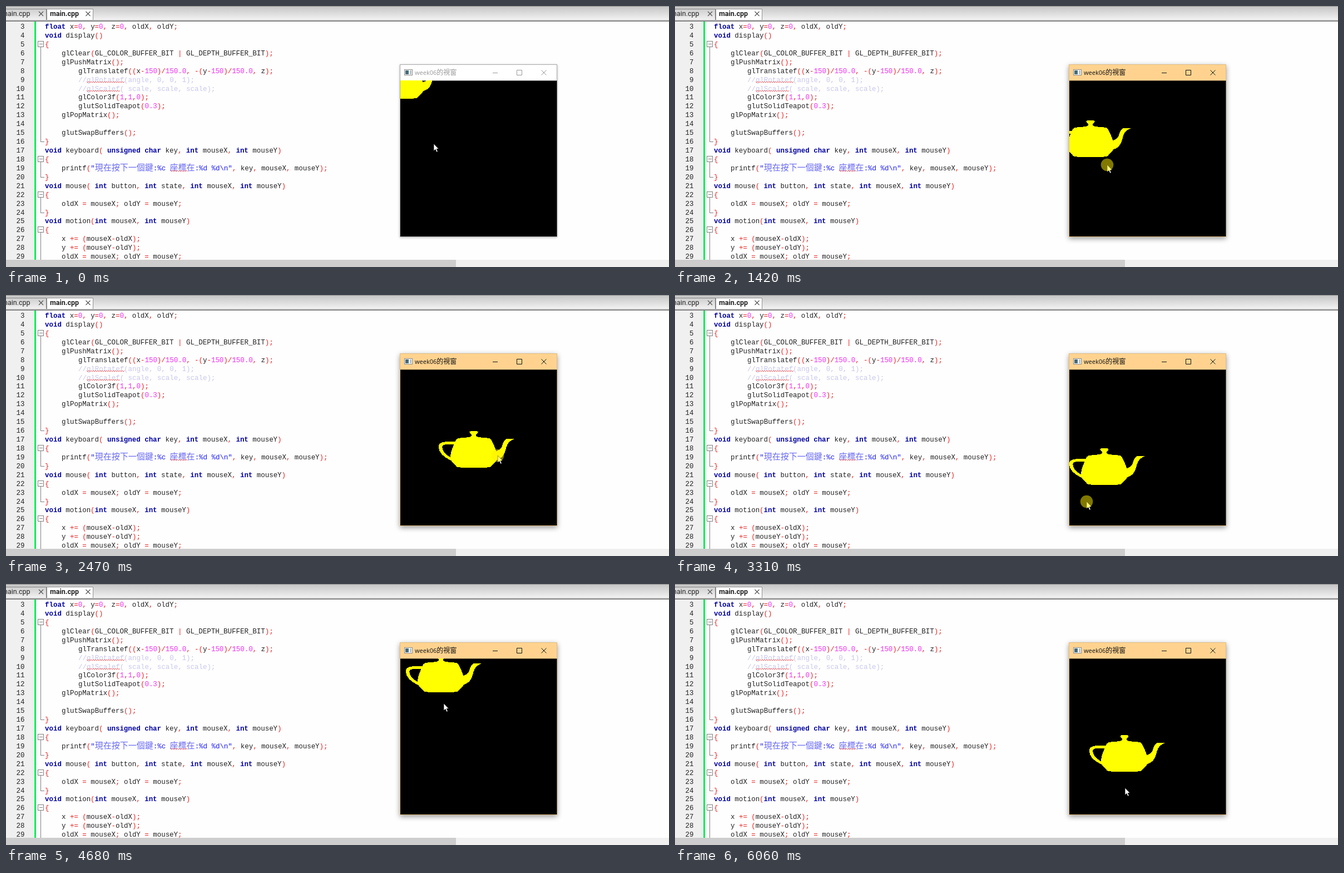
An HTML page for the animation above (6.13 s loop, 1192x470 px).

```html
<!DOCTYPE html>
<html lang="zh-Hant">
<head>
<meta charset="utf-8">
<style>
  html, body { margin: 0; width: 100%; height: 100%; overflow: hidden; background: #fefefe; }
  svg { display: block; }
  #code text, #gutter text { font: 12.45px "Liberation Mono", monospace; fill: #222; white-space: pre; }
  #gutter text { text-anchor: end; }
  #code .keyword { fill: #0000a0; font-weight: bold; }
  #code .number { fill: #f030f0; }
  #code .operator { fill: #f02020; }
  #code .string { fill: #1c1cf0; }
  #code .comment { fill: #c8c8ec; }
  #code .cjk { font: 300 15px "Noto Sans CJK TC", "Noto Sans CJK", sans-serif; fill: #6868f4; }
  .line { fill: none; stroke: #808080; shape-rendering: crispEdges; }
  .tab { font: 12.5px Roboto, sans-serif; fill: #222; }
  .tab.current { font-weight: bold; }
  .cross { fill: none; stroke: #555; stroke-width: 1.2; }
  #window { --ink: #999; --bar: #fff; --edge: #aaa; --shadow: drop-shadow(0 1px 2px #0004); }
  #window.active { --ink: #111; --bar: #ffd38f; --edge: #e3bc80; --shadow: drop-shadow(0 3px 5px #0006); }
  #frame { fill: var(--bar); stroke: var(--edge); filter: var(--shadow); }
  #title { font: 11px "Open Sans", "Noto Sans CJK TC", sans-serif; fill: var(--ink); }
  #title tspan { font: 12px "Noto Sans CJK TC", "Noto Sans CJK", sans-serif; }
  #buttons { fill: none; stroke: var(--ink); }
</style>
</head>
<body>
<svg width="1192" height="470" viewBox="0 0 1192 470">
  <defs>
    <linearGradient id="strip" x2="0" y2="1">
      <stop stop-color="#c4c4c4"/><stop offset="1" stop-color="#f2f2f2"/>
    </linearGradient>
    <clipPath id="client"><rect x="709" y="134" width="281.500" height="281"/></clipPath>
    <path id="half" d="M0 3.15C.8 3.15 0 2.85 .2 2.7C.4 2.55 1.3 2.58 1.4 2.49L1.5 2.4
      C1.75 1.875 2 1.35 2 .9C2 .45 1.5 .225 1.5 .15C1.5 .075 1.425 0 0 0H-.1V3.15Z"/>
  </defs>

  <rect width="50" height="457" y="28" fill="#f0f0f0"/>
  <rect x="51" y="28" width="3" height="429" fill="#00f050"/>
  <g id="gutter"></g>
  <g id="code"></g>

  <rect width="1192" height="25" fill="url(#strip)"/>
  <rect width="1192" height="1" fill="#8c8c8c"/>
  <rect y="25" width="1192" height="2" fill="#c4c4c4"/>
  <rect y="26.500" width="1192" height="1.500" fill="#787878"/>
  <path class="line" d="M0 5.5H72.5V25"/>
  <path d="M73.5 25V5.5H156.5V25" fill="#fff" stroke="#909090"/>
  <text class="tab" x="-8" y="18">main.cpp</text>
  <text class="tab current" x="79" y="18">main.cpp</text>
  <path class="cross" d="M59 10l8 8m0-8l-8 8M143.500 10l8 8m0-8l-8 8"/>

  <rect y="457" width="1192" height="13" fill="#f0f0f0"/>
  <rect y="457" width="809" height="13" fill="#cdcdcd"/>

  <g id="window">
    <rect id="frame" x="708.5" y="105.500" width="282" height="310"/>
    <rect x="716.5" y="114.500" width="14" height="10" fill="#fff" stroke="#888"/>
    <rect x="718" y="116" width="6" height="7" fill="#456b78"/>
    <rect x="726" y="116" width="3" height="7" fill="#b8c4c8"/>
    <text id="title" x="735" y="124">week06<tspan>的視窗</tspan></text>
    <path id="buttons" d="M875 120.500h9M918.500 115.500h9v9h-9zM962.500 115.500l9 9m0-9l-9 9"/>
    <rect x="709" y="134.400" width="281.500" height="280.600"/>
    <g clip-path="url(#client)">
      <g id="teapot" fill="#ff0" shape-rendering="crispEdges">
        <use href="#half"/>
        <use href="#half" transform="scale(-1 1)"/>
        <path d="M-1.5 2.25C-2.5 2.25-3 2.25-3 1.8C-3 1.35-2.65 .9375-1.9 .6L-2 .9
          C-2.5 1.125-2.7 1.575-2.7 1.8C-2.7 2.025-2.3 2.025-1.6 2.025Z"/>
        <path d="M1.7 1.425C2.6 1.425 2.3 2.1 2.7 2.4L2.78 2.46H3.42L3.3 2.4C2.4 2.025 3.1 .825 1.7 .6Z"/>
      </g>
    </g>
  </g>

  <g id="pointer">
    <path d="M0 0V13L3 10.300 5.200 15.200 7.300 14.300 5.200 9.500H9Z" fill="#fff" stroke="#000" stroke-width=".7"/>
    <circle id="press" r="11.3" fill="#ffef00" fill-opacity=".5"/>
  </g>
</svg>

<script>
const byId = id => document.getElementById(id);

const source = String.raw`float x=0, y=0, z=0, oldX, oldY;
void display()
{
    glClear(GL_COLOR_BUFFER_BIT | GL_DEPTH_BUFFER_BIT);
    glPushMatrix();
        glTranslatef((x-150)/150.0, -(y-150)/150.0, z);
        //glRotatef(angle, 0, 0, 1);
        //glScalef( scale, scale, scale);
        glColor3f(1,1,0);
        glutSolidTeapot(0.3);
    glPopMatrix();

    glutSwapBuffers();
}
void keyboard( unsigned char key, int mouseX, int mouseY)
{
    printf("現在按下一個鍵:%c 座標在:%d %d\n", key, mouseX, mouseY);
}
void mouse( int button, int state, int mouseX, int mouseY)
{
    oldX = mouseX; oldY = mouseY;
}
void motion(int mouseX, int mouseY)
{
    x += (mouseX-oldX);
    y += (mouseY-oldY);
    oldX = mouseX; oldY = mouseY;`.split('\n');

const FIRST_LINE = 3, CELL = 7.5;
const lineY = number => 37 + (number - FIRST_LINE) * 15.93;

const tokens = /(\/\/.*)|(".*?")|\b(float|void|int|unsigned|char)\b|\b(\d[\d.]*)|([(){};=,+\-\/|])|\w+/g;
const kinds = ['comment', 'string', 'keyword', 'number', 'operator'];

function highlight(line) {
  return line.replace(tokens, (token, ...groups) => {
    const kind = kinds.find((_, i) => groups[i]);
    const text = token.replace(/[\u4e00-\u9fff]+/g, '<tspan class="cjk">$&</tspan>');
    return kind ? `<tspan class="${kind}">${text}</tspan>` : text;
  });
}

function squiggle(x, width, y) {
  let d = `M${x} ${y}`;
  for (let i = 0; i < width / 2; i++) d += `l2 ${i % 2 ? -2 : 2}`;
  return `<path d="${d}" fill="none" stroke="#f04848" stroke-width=".9"/>`;
}

function fold(from, to) {
  const top = Math.round(lineY(from)) + .5, end = Math.round(lineY(to)) + .5;
  return `<path class="line" d="M57.500 ${top - 6}h10v10h-10zM59.500 ${top - 1}h6M62.500 ${top + 4}V${end}h6"/>`;
}

byId('code').innerHTML = source.map((line, i) => {
  const body = line.trimStart();
  const x = 70 + (line.length - body.length) * CELL;
  return `<text x="${x}" y="${lineY(FIRST_LINE + i) + 4}">${highlight(body)}</text>`;
}).join('') + squiggle(145, 68, 136) + squiggle(145, 60, 152) + squiggle(296, 30, 296);

byId('gutter').innerHTML = source.map((_, i) =>
  `<text x="33.500" y="${lineY(FIRST_LINE + i) + 4}">${FIRST_LINE + i}</text>`).join('') +
  fold(5, 16) + fold(18, 20) + fold(22, 24) + fold(26, 31);

// Pointer path: tick, x, y, button held from here on.
const path = [
  [2, 769, 248, 0], [8, 739, 181, 1], [21, 777, 286, 1], [28, 812, 343, 0],
  [30, 812, 341, 0], [33, 825, 307, 1], [36, 884, 289, 1], [39, 942, 250, 1],
  [40, 945, 240, 0], [43, 870, 292, 1], [48, 740, 372, 1], [52, 702, 382, 1],
  [53, 702, 382, 1], [61, 851, 373, 0], [63, 888, 363, 1], [67, 787, 215, 1],
  [68, 787, 215, 0], [69, 787, 215, 0], [73, 783, 224, 1], [77, 840, 362, 1],
  [79, 860, 371, 1], [82, 898, 340, 1], [87, 809, 367, 1], [88, 809, 367, 0]
];
const LOOP = 6130, TICK = 69, LEAD = 31, LAST_TICK = 88, FIRST_PRESS = 8;
const UNIT = 0.15 * 140.5;

// Follows the pointer; the teapot moves along while the button is held.
function poseAt(tick) {
  let [, x, y, held] = path[0];
  let potX = 709, potY = 134;
  for (let i = 1; i < path.length && path[i - 1][0] <= tick; i++) {
    const [t0, x0, y0, down] = path[i - 1], [t1, x1, y1, next] = path[i];
    const part = Math.min(1, (tick - t0) / (t1 - t0));
    const dx = (x1 - x0) * part, dy = (y1 - y0) * part;
    x = x0 + dx;
    y = y0 + dy;
    held = part < 1 ? down : next;
    if (down) { potX += dx; potY += dy; }
  }
  return { x, y, held, potX, potY };
}

function draw() {
  const time = performance.now() % LOOP;
  const tick = Math.min(LAST_TICK, Math.floor((time + LEAD) / TICK));
  const { x, y, held, potX, potY } = poseAt(tick);
  byId('window').classList.toggle('active', tick >= FIRST_PRESS);
  byId('pointer').setAttribute('transform', `translate(${x} ${y})`);
  byId('press').setAttribute('visibility', held ? 'visible' : 'hidden');
  byId('teapot').setAttribute('transform',
    `translate(${potX} ${potY}) scale(${UNIT} ${-UNIT}) translate(0 -1.575)`);
  requestAnimationFrame(draw);
}
draw();
</script>
</body>
</html>
```
